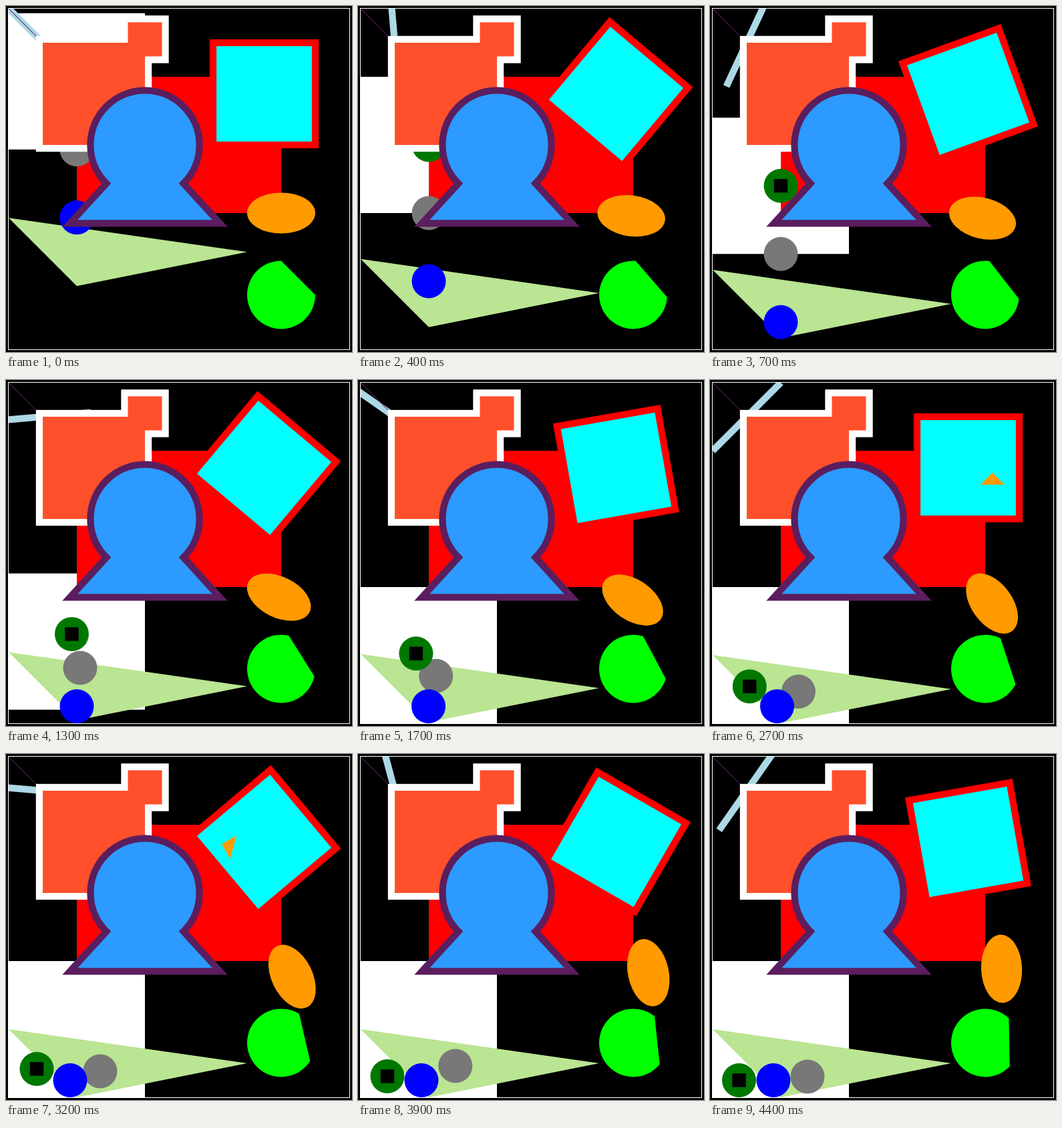
An HTML page with a canvas that plays this animation: 518x518 px, repeating every 4500 ms.

```html
<!DOCTYPE html>
<html>
<head>
<meta charset="utf-8">
<title>Shapes</title>
<style>
html, body { margin: 0; width: 100%; height: 100%; overflow: hidden; background: #000; }
canvas { display: block; width: 518px; height: 518px; }
</style>
</head>
<body>
<canvas id="stage" width="518" height="518"></canvas>
<script>
const ctx = document.getElementById('stage').getContext('2d');
const STEP = 100, STEPS = 45, SCALE = 1.02, EDGE = 4;
const FLOOR = 475;
const rad = deg => deg * Math.PI / 180;

// Bodies as [step, x, y] after they leave free fall
const grayPath = [[10, 100, 420], [13, 104.9, 418.6], [22, 117.6, 445], [32, 134.3, 461.8], [39, 139, 453.9], [44, 139.2, 469.6]];
const greenPath = [[12, 94, 360], [13, 92.6, 369], [22, 67.2, 433.3], [32, 41.2, 458.3], [39, 39.2, 469.1], [44, 38.7, FLOOR]];
const bluePath = [[13, 100, FLOOR], [22, 99, FLOOR], [32, 90.2, FLOOR], [39, 89.2, FLOOR], [44, 89.2, FLOOR]];

function along(path, n) {
  let i = 1;
  while (i < path.length - 1 && path[i][0] < n) i++;
  const [a, ax, ay] = path[i - 1], [b, bx, by] = path[i];
  const k = Math.min(1, (n - a) / (b - a));
  return [ax + (bx - ax) * k, ay + (by - ay) * k];
}

function body(path, startY, n, drop) {
  return n < path[0][0] ? [100, Math.min(FLOOR, startY + drop)] : along(path, n);
}

function spun(x, y, deg, draw) {
  ctx.save();
  ctx.translate(x, y);
  ctx.rotate(rad(deg));
  draw();
  ctx.restore();
}

function rect(color, x, y, w, h) {
  ctx.fillStyle = color;
  ctx.fillRect(x, y, w, h);
}

function poly(color, points) {
  ctx.beginPath();
  points.forEach(p => ctx.lineTo(p[0], p[1]));
  ctx.closePath();
  ctx.fillStyle = color;
  ctx.fill();
}

function line(color, width, x1, y1, x2, y2) {
  ctx.beginPath();
  ctx.moveTo(x1, y1);
  ctx.lineTo(x2, y2);
  ctx.strokeStyle = color;
  ctx.lineWidth = width;
  ctx.stroke();
}

function ball(color, [x, y]) {
  ctx.beginPath();
  ctx.arc(x, y, 25, 0, 7);
  ctx.fillStyle = color;
  ctx.fill();
}

function blocks() {
  const parts = [[50, 50, 150], [175, 20, 50]];
  parts.forEach(([x, y, s]) => rect('#fff', x - 10, y - 10, s + 20, s + 20));
  parts.forEach(([x, y, s]) => rect('#ff4f2b', x, y, s, s));
}

function keyhole() {
  ctx.beginPath();
  ctx.arc(200, 200, 80, rad(135), rad(405));
  ctx.lineTo(310, 315);
  ctx.lineTo(90, 315);
  ctx.closePath();
  ctx.fillStyle = '#2d9aff';
  ctx.fill();
  ctx.strokeStyle = '#5a1e5e';
  ctx.lineWidth = 10;
  ctx.stroke();
}

function scene(n) {
  const time = n ? (n + 1) / 10 : 1 / 30;
  const drop = 200 * time;

  rect('#fff', 0, Math.min(300, drop), 200, 200);
  rect('#f00', 100, 100, 300, 200);

  spun(375, 125, 10 * n, () => {
    rect('#f00', -80, -80, 160, 160);
    rect('#0ff', -70, -70, 140, 140);
  });

  const half = 50 * Math.SQRT2;
  spun(50, 50, 45 + 10 * n, () => line('#add8e6', 10, -half, 0, half, 0));
  line('#5a1e5e', 1, 0, 0, 50, 50);

  spun(312.7 + 19.6 * (32 - n), 128.4 + 0.74 * (32 - n), 90 - 15 * n,
    () => poly('#ff9a00', [[0, 0], [25, 0], [0, 25]]));

  const orbit = rad(225 - 5 * n), reach = 10 * Math.SQRT2;
  ctx.beginPath();
  ctx.ellipse(410 + reach * Math.cos(orbit), 310 + reach * Math.sin(orbit), 50, 30, rad(2 * n), 0, 7);
  ctx.fillStyle = '#ff9a00';
  ctx.fill();

  ctx.beginPath();
  ctx.arc(400, 420, 50, rad(n), rad(n + 270));
  ctx.fillStyle = '#0f0';
  ctx.fill();

  const sink = 100 * (1 - Math.exp(-2.24 * time));
  poly('#bae592', [[0, 300 + sink], [100, 400 + sink], [350, 350 + sink]]);

  ball('#787878', body(grayPath, 200, n, drop));
  const ring = body(greenPath, 100, n, drop);
  ball('#007800', ring);
  rect('#000', ring[0] - 10, ring[1] - 10, 20, 20);
  ball('#00f', body(bluePath, 300, n, drop));

  blocks();
  keyhole();
}

function frame(now) {
  const n = Math.floor(now / STEP) % STEPS;
  rect('#000', 0, 0, 518, 518);
  ctx.save();
  ctx.beginPath();
  ctx.rect(EDGE, EDGE, 510, 510);
  ctx.clip();
  ctx.translate(EDGE, EDGE);
  ctx.scale(SCALE, SCALE);
  scene(n);
  ctx.restore();
  ctx.strokeStyle = '#fff';
  ctx.lineWidth = 1;
  ctx.strokeRect(3.5, 3.5, 511, 511);
}

const start = performance.now();
function loop() {
  frame(performance.now() - start);
  requestAnimationFrame(loop);
}
loop();
</script>
</body>
</html>
```
